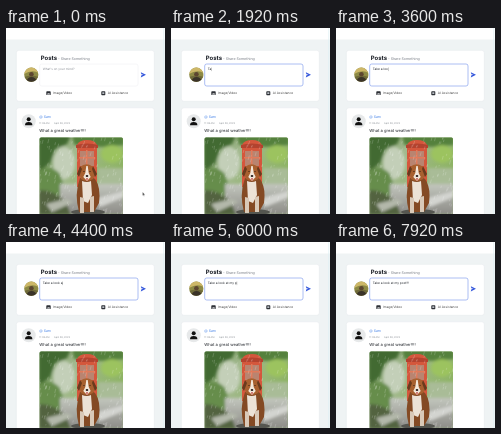
An HTML page for the animation above (8000 ms loop, 159 by 186 pixels).

```html
<!DOCTYPE html>
<html lang="en">
<head>
<meta charset="utf-8">
<title>Post composer</title>
<style>
  html, body { margin: 0; width: 100%; height: 100%; overflow: hidden; background: #eff3f4; }
  svg { display: block; width: 159px; height: 186px; }
  text { font-family: Inter, "Open Sans", sans-serif; text-rendering: geometricPrecision; white-space: pre; }
  .card { fill: #fff; stroke: #e6eaec; stroke-width: .6; }
  .small { font-size: 3.2px; fill: #444; }
  .muted { font-size: 2.4px; fill: #8d9298; }
</style>
</head>
<body>
<svg viewBox="0 0 159 186" xmlns="http://www.w3.org/2000/svg">
  <defs>
    <clipPath id="photo"><path d="M33.500 186V111q0-1.500 1.500-1.500h80.500q1.500 0 1.500 1.500v75z"/></clipPath>
    <clipPath id="face"><circle cx="25.300" cy="46.700" r="7.100"/></clipPath>
    <linearGradient id="leaves" x2="1" y2=".5">
      <stop offset="0" stop-color="#5f8a48"/>
      <stop offset=".4" stop-color="#a3b98f"/>
      <stop offset="1" stop-color="#8bb35f"/>
    </linearGradient>
    <linearGradient id="path" x2="0" y2="1">
      <stop offset="0" stop-color="#c2c6bd"/>
      <stop offset="1" stop-color="#8b8a86"/>
    </linearGradient>
    <filter id="soft"><feGaussianBlur stdDeviation="1.800"/></filter>
    <filter id="fine"><feGaussianBlur stdDeviation=".4"/></filter>
  </defs>

  <rect width="159" height="186" fill="#eff3f4"/>
  <rect width="159" height="11.500" fill="#fff"/>
  <rect x="157.500" width=".7" height="186" fill="#dcf0f3"/>

  <!-- Composer -->
  <rect class="card" x="10.300" y="22.300" width="138" height="51" rx="2.500"/>
  <text x="34.700" y="32" font-size="6" font-weight="700" fill="#161a22">Posts</text>
  <text x="52" y="32" font-size="3.600" fill="#777c84">- Share Something</text>
  <g clip-path="url(#face)">
    <rect x="18" y="39" width="15" height="16" fill="#8d8a45"/>
    <path d="M18 39h15v6q-7-4-15 1z" fill="#cdb768"/>
    <path d="M18 49q7-3 15 0v6H18z" fill="#6f6a3a"/>
    <path d="M20 55q1-6 5.500-6t6 6z" fill="#3a3328"/>
    <circle cx="25.400" cy="46.300" r="2.300" fill="#5d4630"/>
  </g>
  <rect id="box" x="33.700" y="36" width="98.300" height="22" rx="2" fill="#fff" stroke-width=".65"/>
  <text id="hint" x="36.700" y="42.300" font-size="3.100" fill="#8c9097">What's on your mind?</text>
  <text id="typed" x="36.700" y="42.300" font-size="3.200" fill="#22262d"></text>
  <rect id="caret" y="39.500" width=".3" height="3.600" fill="#555"/>
  <path d="M134.800 44.200l5.200 2.600-5.200 2.600.6-2.100 2.100-.5-2.100-.5z" fill="#3457dc"/>

  <g fill="#2d3036">
    <rect x="40.300" y="63.300" width="4.400" height="3.800" rx=".7"/>
    <path d="M40.900 66.500l1.200-1.500.8.8.5-.5.8 1.200z" fill="#fff"/>
    <rect x="95.300" y="63.200" width="4" height="4" rx=".7"/>
    <path d="M96.300 64.300h2v1.700h-2z" fill="#bbc0c6"/>
  </g>
  <text class="small" x="47" y="66.400">Image/Video</text>
  <text class="small" x="101.700" y="66.400">AI Assistance</text>

  <!-- Feed entry -->
  <rect class="card" x="10.300" y="79.800" width="138" height="112" rx="2.500"/>
  <circle cx="22.700" cy="93.300" r="7" fill="#e7e9ea"/>
  <circle cx="22.700" cy="91.200" r="2" fill="#111"/>
  <path d="M19 97.300q0-3.200 3.700-3.200t3.700 3.200z" fill="#111"/>
  <text x="33.300" y="90.200" font-size="3.500" fill="#4a86e8">@ Sam</text>
  <text class="muted" x="33.300" y="95.500">11:08 AM</text>
  <text class="muted" x="48" y="95.500">April 28, 2023</text>
  <text x="33.300" y="103.700" font-size="4.100" fill="#22262c">What a great weather!!!!</text>

  <g clip-path="url(#photo)">
    <rect x="33" y="109" width="85" height="78" fill="url(#leaves)"/>
    <g filter="url(#soft)">
      <path d="M33 107h32l-4 9-12 5-5 14-11 9z" fill="#426b32"/>
      <ellipse cx="58" cy="135" rx="11" ry="16" fill="#c3cfb8"/>
      <path d="M66 107h52v10l-22 2-28-2z" fill="#55813c"/>
      <ellipse cx="106" cy="126" rx="11" ry="9" fill="#9cc35f"/>
      <path d="M33 142q12-6 21 4l6 20-27 5z" fill="#668d4c"/>
      <path d="M92 140h26v24H92z" fill="#a9bc97"/>
      <path d="M54 156h64v31H54z" fill="url(#path)"/>
      <path d="M33 162q16 0 27 12l5 13H33z" fill="#52643f"/>
      <path d="M92 170l26-7v6l-24 10z" fill="#d3d4d0"/>
      <path d="M40 176l20-5 8 3-22 10z" fill="#b3b8aa"/>
    </g>
    <g filter="url(#fine)">
      <path d="M71 117q2-5 10-5t10 5v42H71z" fill="#d4573c"/>
      <path d="M70 117q11-3 22 0v3H70z" fill="#b3432f"/>
      <path d="M74 123h14v15H74z" fill="#b98470"/>
      <path d="M73 129h16v1.500H73zM80 122h1.500v17H80z" fill="#e07a5a"/>
    </g>
    <g id="rain" stroke="#fff" stroke-width=".4" opacity=".45"></g>
    <g filter="url(#fine)">
      <ellipse cx="82" cy="184" rx="17" ry="3" fill="#555650"/>
      <path d="M74 150q8-5 15 1 6 8 4 24l-5 9H73q-5-18 1-34z" fill="#844a24"/>
      <path d="M76 153q5 2 9 0l1 14-4 8-5-2z" fill="#ece2d6"/>
      <path d="M74 169l4 1v15h-4zM84 169l4-1v16h-4z" fill="#d9c9b8"/>
      <path d="M74 139q7-6 14 1 3 6-1 11-6 4-12 0-3-6-1-12z" fill="#a8602f"/>
      <path d="M74 138l-3 8 2 3 3-8zM87 138l4 8-2 3-3-8z" fill="#6a3a1d"/>
      <path d="M80.300 138h1.400l1 7 2 4-3.700 4-3.700-4 2-4z" fill="#f2e7da"/>
      <circle cx="78" cy="143.500" r=".6" fill="#23180f"/>
      <circle cx="84" cy="143.500" r=".6" fill="#23180f"/>
      <ellipse cx="81" cy="148" rx="1.300" ry=".9" fill="#241b17"/>
      <path d="M80 150h2l-.3 2.500h-1.400z" fill="#cf7470"/>
    </g>
  </g>

  <g id="pointer">
    <path id="arrow" d="M0 0v3.600l.8-.7.600 1.300.6-.3-.6-1.200h1.200z" fill="#444" stroke="#fff" stroke-width=".3"/>
    <path id="beam" d="M-.7-1.800h1.400M0-1.800v3.600M-.7 1.800h1.400" fill="none" stroke="#666" stroke-width=".35"/>
  </g>
</svg>
<script>
const $ = id => document.getElementById(id);
const LOOP = 8000, STEP = 80, FOCUS = 960, START = 1440;
const message = "Take a look at my post!!!";
// [ms, characters shown]
const pace = [[START, 0], [2640, 6], [4320, 13], [5920, 19], [6960, 22], [7360, 25]];

// Time at which the nth character appears
function keyTime(n) {
  const i = pace.findIndex(p => p[1] >= n);
  const [t0, n0] = pace[i - 1], [t1, n1] = pace[i];
  return t0 + (t1 - t0) * (n - n0) / (n1 - n0);
}
const keys = [...message].map((_, i) => keyTime(i + 1));

let seed = 11;
const random = () => (seed = seed * 16807 % 2147483647) / 2147483647;
let streaks = "";
for (let i = 0; i < 170; i++) {
  const x = 33 + random() * 85, y = 108 + random() * 76, len = 1 + random() * 3.5;
  streaks += `M${x} ${y}l${-len * .25} ${len}`;
}
$("rain").innerHTML = `<path d="${streaks}" fill="none"/>`;

const show = (id, on) => $(id).setAttribute("visibility", on ? "visible" : "hidden");

function draw(now) {
  const t = Math.floor(now % LOOP / STEP) * STEP;
  const count = keys.filter(k => k <= t).length;
  const focused = t >= FOCUS;
  const p = Math.min(1, Math.max(0, (t - 80) / 800));
  const ease = p * p * (3 - 2 * p);
  const x = 136.5 - 91.5 * ease, y = 164 - 118 * ease;
  const over = x < 132 && y > 36 && y < 58;

  $("pointer").setAttribute("transform", `translate(${x} ${y})`);
  show("pointer", !count);
  $("arrow").style.display = over ? "none" : "";
  $("beam").style.display = over ? "" : "none";

  $("box").setAttribute("stroke", focused ? "#7f9bec" : "#f1f2f4");
  show("hint", !count);
  $("typed").textContent = message.slice(0, count);

  const since = t - (count ? keys[count - 1] : FOCUS);
  const width = count ? $("typed").getComputedTextLength() : 0;
  $("caret").setAttribute("x", 36.7 + width);
  show("caret", focused && since % 1000 < 500);
}

const origin = performance.now();
function tick() {
  draw(performance.now() - origin);
  requestAnimationFrame(tick);
}
tick();
</script>
</body>
</html>
```
